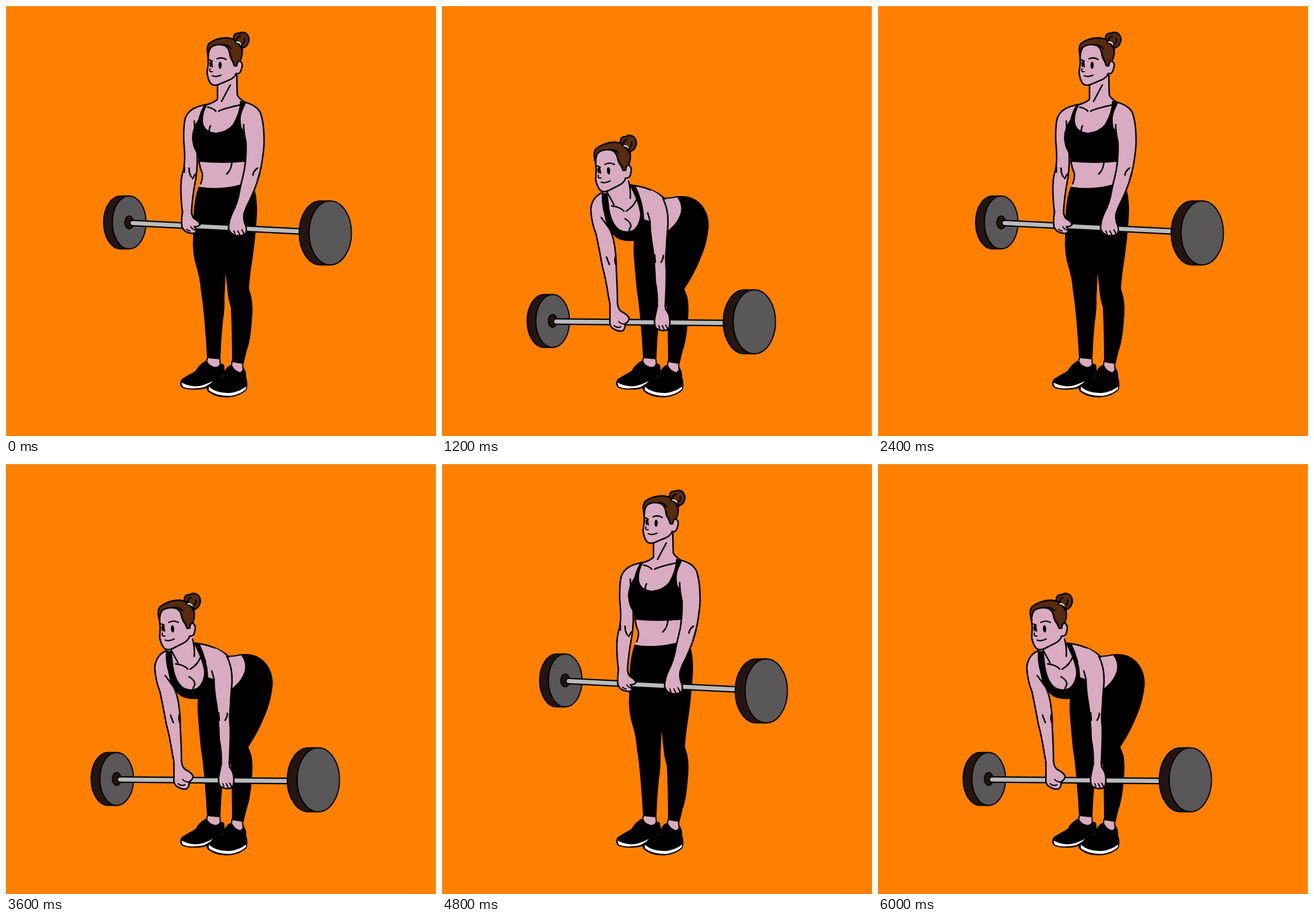
An HTML page with a canvas that plays this animation: 740x740 px, repeating every 7200 ms.

```html
<!DOCTYPE html>
<html lang="en">
<head>
<meta charset="utf-8">
<title>Deadlift</title>
<style>
html, body { margin: 0; width: 100%; height: 100%; overflow: hidden; background: #ff8000; }
canvas { display: block; width: 100vw; height: 100vh; }
</style>
</head>
<body>
<canvas id="stage" width="740" height="740"></canvas>
<script>
const ctx = document.getElementById('stage').getContext('2d');
const SIZE = 740, HOLD = 1200;
const INK = '#000', SKIN = '#d8abc0', HAIR = '#562b10', ORANGE = '#ff8000';
const RIM = '#231512', PLATE = '#5a5758', STEEL = '#b9bcbb';

function fill(d, color) {
  ctx.fillStyle = color;
  ctx.fill(new Path2D(d));
}
function line(d, width = 2.6) {
  ctx.strokeStyle = INK;
  ctx.lineWidth = width;
  ctx.stroke(new Path2D(d));
}
function shape(d, color, width) {
  fill(d, color);
  line(d, width);
}
function oval(x, y, rx, ry, color, stroke = 0) {
  ctx.beginPath();
  ctx.ellipse(x, y, rx, ry, 0, 0, Math.PI * 2);
  ctx.fillStyle = color;
  ctx.fill();
  if (stroke) {
    ctx.strokeStyle = INK;
    ctx.lineWidth = stroke;
    ctx.stroke();
  }
}

// Weight disc: dark rim from x - depth to x, grey face at x
function disc(x, y, rx, ry, depth) {
  const left = x - depth;
  const d = `M${x} ${y - ry}H${left}A${rx} ${ry} 0 0 0 ${left} ${y + ry}H${x}Z`;
  shape(d, RIM, 2);
  oval(x, y, rx, ry, PLATE, 2);
}

// barY is the height of the bar where it meets the right disc
function barbell(lx, ly, rx, ry, barY) {
  disc(lx, ly, 29, 45.5, 15);
  oval(lx, ly, 7.5, 11, RIM, 2);
  ctx.lineCap = 'round';
  for (const [color, width] of [[INK, 11.5], [STEEL, 7]]) {
    ctx.strokeStyle = color;
    ctx.lineWidth = width;
    ctx.beginPath();
    ctx.moveTo(lx + 6, ly + 1);
    ctx.lineTo(rx - 50, barY);
    ctx.stroke();
  }
  disc(rx, ry, 36.5, 55, 17);
}

function head() {
  shape('M349 73Q347 86 348 99L346 115Q348 129 353 134Q358 138 366 135L385 127Q394 123 396 116Q403 118 405 109Q409 99 403 95L390 70Q370 58 349 73Z', SKIN);
  shape('M348 88Q344 70 350 64Q364 54 383 55Q401 58 406 72Q408 84 403 94Q398 95 397 103H393L390 95Q386 90 385 81Q383 69 373 67Q358 65 352 72Q348 78 348 88Z', HAIR);
  line('M372 67Q381 66 387 73M385 80Q386 90 392 97');
  shape('M397 61Q390 58 392 52Q394 46 401 47Q409 43 415 49Q420 56 417 63Q413 73 406 71L402 65Z', HAIR);
  line('M397 61Q396 54 403 52M405 66Q412 63 410 57');
  fill('M393 60Q403 60 409 73L405 77Q402 66 393 63Z', INK);
  ctx.strokeStyle = '#fff';
  ctx.lineWidth = 1.8;
  ctx.stroke(new Path2D('M397 62Q402 62 404 66'));
  line('M349 92L355 95M363 91Q371 87 379 92', 2.3);
  oval(352, 100, 1.9, 5, INK);
  oval(368.5, 102, 2.7, 6.2, INK);
  line('M354 96L355 105M351 108Q349 114 355 113', 2);
  line('M355 120Q362 123 370 119', 2.2);
}

// From the right knee round both ankles to the left knee
const SHINS = 'L421 500Q425 517 422 542Q420 575 413 594L408 615L390 612Q390 560 388 519Q383 504 382 488Q380 467 377 444Q377 470 375 500Q376 520 372 545Q369 575 368 607L347 605Q345 570 342 536Q340 512 336 487';

function feet() {
  shape('M347 604L345 612Q350 622 363 623L369 618L368 606Z', SKIN, 2);
  shape('M345 611Q333 617 327 629Q314 636 303 643Q298 651 304 656Q320 661 339 658Q349 655 356 650L376 632L374 618L369 616Q367 623 358 622Q348 620 345 611Z', INK, 2.4);
  fill('M302 648Q317 656 333 654Q346 651 356 645Q348 655 336 657Q314 660 304 655Z', '#fff');
  shape('M389 611L388 619Q394 631 403 632L408 627L407 614Z', SKIN, 2);
  shape('M388 619Q379 620 375 637Q363 647 348 653Q344 659 349 663Q363 674 385 672Q404 670 413 660Q416 649 412 639Q413 631 408 623Q410 630 404 632Q391 628 388 619Z', INK, 2.4);
  fill('M349 655Q362 667 385 666Q402 664 413 655V659Q403 669 385 671Q361 671 349 661Z', '#fff');
}

function standing() {
  feet();
  fill('M364 128L364 158Q361 165 345 170L322 195L332 266L338 288L332 314L406 312L410 285L414 200L408 165L398 156L397 112Z', SKIN);
  line('M364 135V160Q361 165 345 170M397 114L398 153Q400 158 410 165');
  line('M332 266Q334 280 338 288Q339 296 335 306');
  shape('M332 312Q367 318 405 308L428 320Q433 342 430 372Q428 400 424 430Q419 460 417 486' + SHINS + 'Q335 470 329 450Q321 425 323 397Q322 340 332 312Z', INK, 2);

  const armL = 'M344 170Q316 174 309 192Q305 204 306 235Q309 262 306 280Q300 296 301 322Q302 344 304 357';
  const armR = 'M409 165Q431 170 438 184Q445 205 444 240Q441 272 436 289Q431 312 414 345L409 359';
  const innerL = 'M319 356Q321 328 325 306Q330 282 329 256L325 220L324 198';
  const innerR = 'M389 357Q399 340 403 313L410 283Q414 258 413 235Q409 217 409 204';
  fill(armL + innerL.replace('M', 'L') + 'Z', SKIN);
  fill(armR + innerR.replace('M', 'L') + 'Z', SKIN);
  line(armL + innerL);
  line(armR + innerR);
  line('M307 277L307 286M315 279Q315 289 319 294M326 289L321 297');
  line('M425 291Q426 283 433 279M433 299L437 287');

  fill('M343 168Q335 178 331 195Q320 211 320 227Q321 245 329 254L332 268Q372 272 413 268V231Q411 216 405 208Q402 191 407 180L413 167L403 163Q402 185 390 204Q380 216 362 218Q342 217 339 200Q338 183 347 169Z', INK);
  line('M347 174Q357 176 361 181M366 181Q372 177 404 170');
  line('M386 136L371 164M352 206Q349 211 350 219');
  line('M389 267Q388 282 380 289');
  head();

  barbell(212, 372.5, 558, 390.5, 388);
  shape('M304 353Q301 369 303 381Q308 390 318 391Q327 393 328 385L324 380Q331 380 334 376Q332 370 324 366Q320 363 319 353', SKIN);
  line('M311 384Q313 387 317 387M318 380Q321 385 327 386', 2);
  shape('M391 353Q383 369 383 383Q386 393 396 395Q408 397 413 390Q415 383 411 374Q408 366 410 355', SKIN);
  line('M392 387L394 392M399 387L402 393M406 385L409 391', 2);
}

function bent() {
  feet();
  shape('M332 398L360 380L390 388Q411 374 412 350Q412 338 402 329Q425 325 440 337Q459 353 458 381Q455 410 444 434Q434 460 416 487' + SHINS + 'Q333 455 331 430Q330 412 332 398Z', INK, 2);
  fill('M276 322L286 320L290 300L321 288L324 308Q362 314 383 332L388 388L358 404H330L292 388L258 355Z', SKIN);
  shape('M381 331Q394 331 405 328Q415 341 412 355Q407 374 388 388L386 350Z', SKIN, 2);
  line('M284 320L296 342M321 301Q325 315 324 331M324 308Q362 312 384 332');

  const armL = 'M276 321Q258 329 256 350Q257 372 265 392Q271 420 276 448Q282 470 286 497L290 518';
  const innerL = 'M302 516Q302 488 300 455Q300 423 295 402Q291 386 285 379L274 364';
  const armR = 'M360 317Q381 326 387 345Q390 374 387 408Q384 430 386 455Q386 488 384 518';
  const innerR = 'M370 518Q372 499 367 474Q366 444 363 418Q358 390 358 370L354 356';
  fill(armL + innerL.replace('M', 'L') + 'Z', SKIN);
  fill(armR + innerR.replace('M', 'L') + 'Z', SKIN);
  line(armL + innerL);
  line('M380 331Q390 350 389 376Q387 395 386 418Q384 434 386 455Q386 488 384 518' + innerR);
  line('M283 432L288 445M299 430Q296 437 299 445M366 428L367 441M381 429Q381 435 377 441');

  fill('M275 322Q274 340 279 358L283 376Q290 392 302 400Q314 406 335 404H361L357 370L348 367Q347 337 333 309L322 307Q338 336 341 358Q340 377 329 385Q318 391 305 384Q292 374 288 348L285 322Z', INK);
  line('M292 344Q307 346 313 353M317 353Q330 345 334 334');
  line('M315 366Q325 372 325 379L322 386');

  ctx.save();
  ctx.translate(283.5, 320);
  ctx.rotate(-4 * Math.PI / 180);
  ctx.scale(1.03, 1.03);
  ctx.translate(-363, -137);
  head();
  ctx.restore();

  barbell(190.5, 542, 537.5, 543.5, 545.5);
  shape('M289 513L289 540Q288 550 293 554Q302 561 311 559Q316 555 315 547Q322 543 322 537Q318 530 309 526Q303 522 302 512', SKIN);
  line('M296 550Q301 555 308 552M304 543Q309 548 315 547', 2);
  shape('M371 514L366 538Q365 548 368 554Q377 561 389 557Q393 551 392 539Q391 529 385 522L384 514', SKIN);
  line('M373 550L375 555M379 550L382 556M385 549L388 555', 2);
}

function draw(now) {
  const upright = Math.floor(now / HOLD) % 2 === 0;
  ctx.lineCap = ctx.lineJoin = 'round';
  ctx.fillStyle = ORANGE;
  ctx.fillRect(0, 0, SIZE, SIZE);
  // Pale hairline along the top and one side
  ctx.fillStyle = 'rgba(255,255,255,.25)';
  ctx.fillRect(0, 0, SIZE, 1);
  ctx.fillRect(upright ? 0 : SIZE - 1, 1, 1, SIZE);
  if (upright) standing();
  else bent();
}

let start;
function tick(now) {
  start ??= now;
  draw(now - start);
  requestAnimationFrame(tick);
}
requestAnimationFrame(tick);
</script>
</body>
</html>
```
